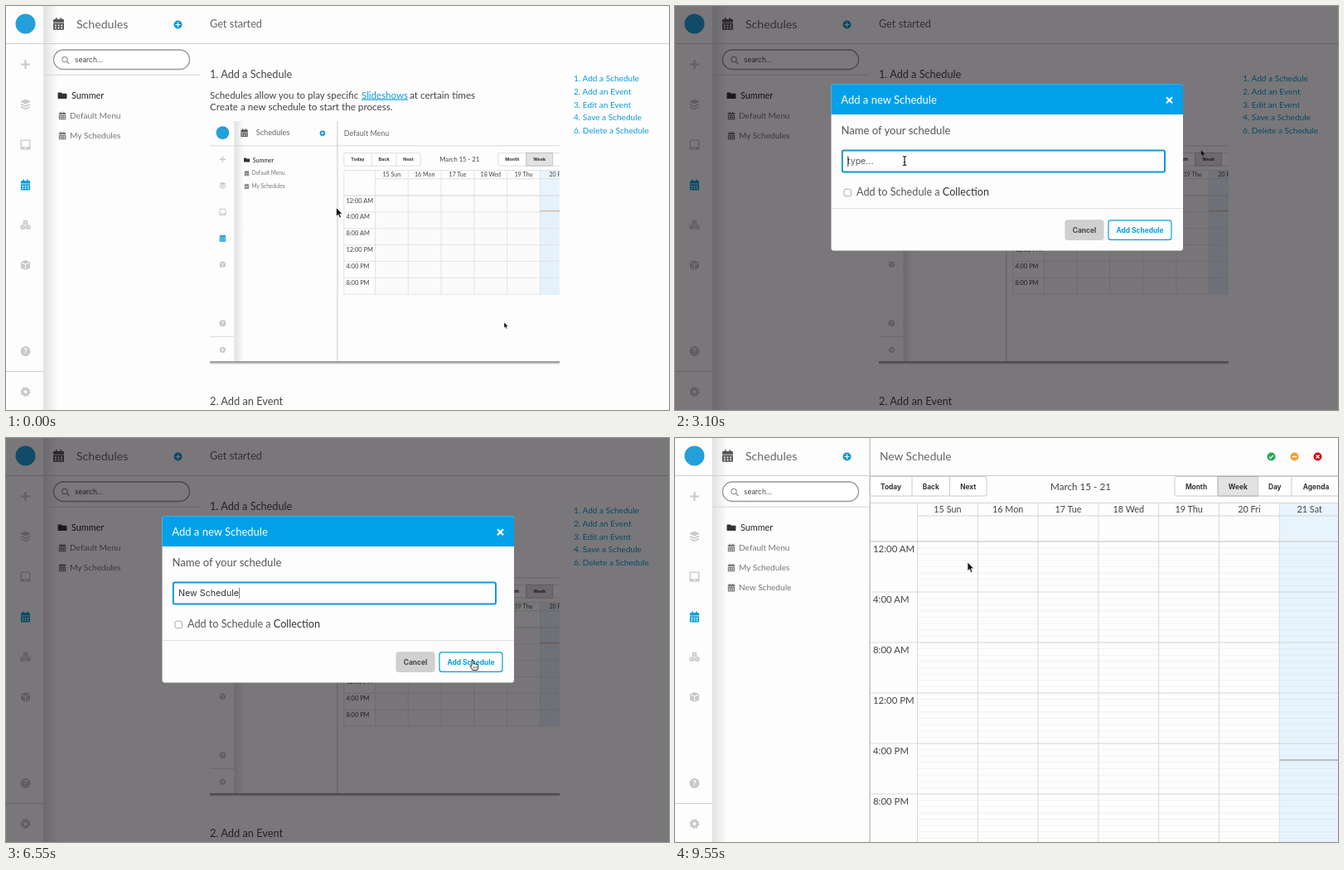
An HTML page for the animation above (9600 ms loop, 800 px wide and 488 px high).

```html
<!DOCTYPE html>
<html lang="en">
<head>
<meta charset="utf-8">
<title>Adding a schedule</title>
<style>
  html, body { margin: 0; width: 100%; height: 100%; overflow: hidden; background: #fefdfe; }
  svg { display: block; font-family: Lato, sans-serif; }
  .ui { font-family: Inter, sans-serif; }
  .bold { font-family: Inter, sans-serif; font-weight: 700; text-anchor: middle; }
  .mid { text-anchor: middle; }
</style>
</head>
<body>
<svg id="stage" width="800" height="488" viewBox="0 0 800 488"></svg>
<script>
const LOOP = 9600, STEP = 50;
const BLUE = '#0a9bd8', INK = '#444', GREY = '#c8c8c8', PAPER = '#fefdfe';
const DAYS = ['15 Sun', '16 Mon', '17 Tue', '18 Wed', '19 Thu', '20 Fri', '21 Sat'];
const HOURS = ['12:00 AM', '4:00 AM', '8:00 AM', '12:00 PM', '4:00 PM', '8:00 PM'];

const clamp = (v, lo = 0, hi = 1) => Math.min(hi, Math.max(lo, v));
const ramp = (t, from, to) => clamp((t - from) / (to - from));
const ease = p => p * p * (3 - 2 * p);
const between = (t, a, b) => t >= a && t < b;

// --- drawing helpers
const text = (x, y, size, str, fill = INK, attrs = '') =>
  `<text x="${x}" y="${y}" font-size="${size}" fill="${fill}" ${attrs}>${str}</text>`;
const rect = (x, y, w, h, fill, attrs = '') =>
  `<rect x="${x}" y="${y}" width="${w}" height="${h}" fill="${fill}" ${attrs}/>`;
const stroke = (d, color, width = 1, attrs = '') =>
  `<path d="${d}" fill="none" stroke="${color}" stroke-width="${width}" ${attrs}/>`;
const circle = (x, y, r, fill) => `<circle cx="${x}" cy="${y}" r="${r}" fill="${fill}"/>`;
const at = (x, y, body, scale = 1, attrs = '') =>
  `<g transform="translate(${x} ${y}) scale(${scale})" ${attrs}>${body}</g>`;
const dim = (w, h) => rect(0, 0, w, h, '#040005', 'opacity=".53"');

const cube = '<path d="M0-7L6.5-4.3V4L0 7-6.5 4V-4.3z"/>' +
  stroke('M-5.2-3.2L0-1 5.2-3.2M0-1V6', PAPER, 1.3);
const calendarHoles = [-5, -1, 3].flatMap(x => [1, 4.3].map(y => `M${x} ${y}v2h2v-2z`)).join('');
const icons = {
  plus: '<path d="M-1.1-5.5h2.2v4.4h4.4v2.2h-4.4v4.4h-2.2v-4.4h-4.4v-2.2h4.4z"/>',
  layers: '<path d="M0-6.5L6.5-3.5 0-.5-6.5-3.5zM-6.5 0l2-.9L0 1.2 4.5-.9l2 .9L0 3zM-6.5 3.3l2-.9L0 4.5 4.5 2.4l2 .9L0 6.3z"/>',
  tablet: '<path fill-rule="evenodd" d="M-5-6h10q1 0 1 1v10q0 1-1 1h-10q-1 0-1-1v-10q0-1 1-1zM-4.6-4.7v7.4h9.2v-7.4zM-1 3.6v1.4h2v-1.4z"/>',
  calendar: `<path fill-rule="evenodd" d="M-6-6h2v-2h2v2h4v-2h2v2h2q1 0 1 1v3h-14v-3q0-1 1-1zM-7-1h14v8q0 1-1 1h-12q-1 0-1-1z${calendarHoles}"/>`,
  folder: '<path d="M-8-5q0-1 1-1h5l2 2h7q1 0 1 1v7q0 1-1 1h-14q-1 0-1-1z"/>',
  cube: at(0, 0, cube, .85),
  cubes: at(0, -3, cube, .45) + at(-3.2, 2.6, cube, .45) + at(3.2, 2.6, cube, .45),
  help: circle(0, 0, 6, GREY) + text(0, 3.4, 9, '?', PAPER, 'class="bold"'),
  gear: `<g fill="none" stroke="${GREY}"><circle r="3.4" stroke-width="2.8"/><circle r="5" stroke-width="2" stroke-dasharray="2.2 1.73"/></g>`
};
const icon = (name, x, y, fill = GREY, scale = 1) => at(x, y, icons[name], scale, `fill="${fill}"`);

const cursors = {
  arrow: '<path d="M0 0V10.6L2.4 8.4 4.1 12.4 6 11.6 4.3 7.7H7.6z" fill="#111" stroke="#fff" stroke-width=".7"/>',
  hand: '<path d="M-1 0.8q1-1.4 2 0V5q1.2-.9 2 .2 1.2-.7 1.9.4 1.6-.4 1.8 1V9q0 2-1.3 3.5H.2Q-1 10.4-3 7.6q0-1.4 2-.2z" fill="#fff" stroke="#111" stroke-width=".9"/>' +
    stroke('M1.2 8v2.6M3 8v2.6M4.8 8v2.6', '#111', .6),
  beam: stroke('M-2.2-5.5Q0-5.5 0-4 0-5.5 2.2-5.5M0-4.5V4.5M-2.2 5.5Q0 5.5 0 4 0 5.5 2.2 5.5M-1.2 1.5H1.2', '#111', 1.1)
};

// Each stop is [arrive, leave, x, y].
function follow(stops, t) {
  const i = stops.findIndex(s => t < s[0]);
  if (i < 0) return stops[stops.length - 1].slice(2);
  const a = stops[i - 1], b = stops[i], p = ease(ramp(t, a[1], b[0]));
  return [a[2] + (b[2] - a[2]) * p, a[3] + (b[3] - a[3]) * p];
}
const pointer = (stops, t, kind) => kind ? at(...follow(stops, t), cursors[kind]) : '';

// --- parts shared by the page and the tutorial clip inside it
function row(y, label, { folder, hover, indent = 0 } = {}) {
  const x = 68 + indent, ink = hover ? BLUE : folder ? '#222' : '#777';
  return (hover ? rect(57 + indent, y - 12, 165 - indent * 1.6, 24, '#ececf2', 'rx="3"') : '') +
    icon(folder ? 'folder' : 'calendar', x, y, folder ? '#333' : hover ? BLUE : '#777', folder ? .68 : .6) +
    text(x + (folder ? 11 : 9), y + 3.7, folder ? 10.8 : 10.1, label, ink);
}

function frameOf(height, width, tools, buttonGrow = 0) {
  const side = tools.map((name, i) =>
    icon(name, 23.5, 70.5 + i * 48.5, name === 'calendar' ? BLUE : GREY, name === 'calendar' ? .8 : 1)).join('');
  return rect(45, 0, 18, height, 'url(#shade)') +
    stroke(`M0 45.5H${width}M0 ${height - 46.5}H45`, '#cfcfcf', 1.2) +
    circle(23.5, 21.5, 12, '#239fd9') + side +
    icon('help', 23.5, height - 71) + icon('gear', 23.5, height - 22) +
    icon('calendar', 63.5, 21.5, '#555', .92) + text(85, 26.5, 14.1, 'Schedules', '#666') +
    circle(207.5, 22.5, 5 + 7 * buttonGrow, BLUE) + icon('plus', 207.5, 22.5, '#fff', .53 + .3 * buttonGrow);
}

function buttonBar(edges, y, labels, active) {
  const end = edges[labels.length];
  return rect(edges[0], y, end - edges[0], 23.5, '#fff', 'rx="2" stroke="#ccc"') +
    labels.map((label, i) => {
      const w = edges[i + 1] - edges[i];
      return (label === active ? rect(edges[i], y, w, 23.5, '#e2e2e2', 'stroke="#aaa"') : '') +
        (i ? stroke(`M${edges[i]} ${y}v23.5`, '#ccc') : '') +
        text(edges[i] + w / 2, y + 15, 8.3, label, '#333', 'class="bold"');
    }).join('');
}

function calendar({ x, y, colW, rowH, titleX, rightX, today, nowY, nowColor }) {
  const left = x + 57.5, right = left + 7 * colW, top = y + 32, body = y + 78.5, bottom = body + 6 * rowH;
  let faint = '', grid = '', labels = '';
  for (let i = 1; i < 48; i++) faint += `M${left} ${body + i * rowH / 8}H${right}`;
  DAYS.forEach((day, i) => {
    grid += `M${left + i * colW} ${top}V${bottom}`;
    labels += text(left + (i + .5) * colW, top + 11, 10.8, day, INK, 'class="mid"');
  });
  HOURS.forEach((hour, i) => {
    grid += `M${x} ${body + (i + 1) * rowH}H${right}`;
    labels += text(x + 4, body + i * rowH + 13, 11.4, hour);
  });
  const todayX = left + today * colW;
  return buttonBar([0, 51, 96.5, 141].map(e => x + e), y, ['Today', 'Back', 'Next']) +
    text(titleX, y + 16.5, 11.7, 'March 15 - 21', INK, 'class="mid"') +
    buttonBar([0, 52, 100.5, 141, 200].map(e => rightX + e), y, ['Month', 'Week', 'Day', 'Agenda'], 'Week') +
    rect(todayX, top, colW, bottom - top, '#e8f4fd') +
    stroke(faint, '#000', 1, 'opacity=".045"') + stroke(grid, '#d9d9d9') +
    stroke(`M${x} ${bottom}V${top}H${right}M${left} ${top + 15.5}H${right}`, '#d4d4d4') +
    stroke(`M${x} ${body}H${right}`, '#d4d4d4', 1.6) +
    stroke(`M${todayX} ${nowY}h${colW}`, nowColor, 1.3) + labels;
}

function button(right, y, w, label, color, fill = '#fff', ink = color) {
  return rect(right - w, y, w, 23.5, fill, `rx="3" stroke="${color}" stroke-width="1.2"`) +
    text(right - w / 2, y + 15.2, 8.4, label, ink, 'class="bold"');
}

function panel(w, h, color, title, body) {
  return rect(0, 0, w, h, PAPER, 'rx="3"') +
    `<path d="M0 36.8V3Q0 0 3 0H${w - 3}Q${w} 0 ${w} 3V36.8z" fill="${color}"/>` +
    text(11.8, 24.3, 13, title, '#fff') +
    stroke(`M${w - 20} 16l7 7m0-7l-7 7`, '#fff', 2.2) +
    stroke(`M0 ${h - 51}H${w}`, '#ddd') + body;
}

function scheduleDialog(w, typed, focused, checkLabel, lastWord) {
  const field = typed
    ? text(19.5, 97.2, 10.7, `${typed}<tspan dx="-1" font-weight="300">|</tspan>`, '#333', 'class="ui"')
    : text(19.5, 97.2, 10.6, 'type...', '#555', 'class="ui"') + stroke('M20.3 87v13', '#222', .9);
  return panel(w, 201.2, '#02a0e9', 'Add a new Schedule',
    text(12, 60.8, 13.1, 'Name of your schedule', '#555') +
    rect(13.3, 80.3, w - 35.3, 26, '#fff', `rx="2" stroke="${focused ? '#1598cc' : '#aaa'}" stroke-width="${focused ? 2 : 1.2}"`) +
    field + rect(15.5, 127, 8.5, 8.5, '#fff', 'rx="2" stroke="#aaa"') +
    text(30.5, 134.5, 12.65, `${checkLabel} <tspan fill="#333">${lastWord}</tspan>`, '#555') +
    button(w - 96, 164.6, 46, 'Cancel', '#d0d0d0', '#d0d0d0', '#444') +
    button(w - 14, 164.6, 76, 'Add Schedule', BLUE));
}

const eventDialog = w => panel(w, 157, '#0fb455', 'Add an Event',
  button(w - 62, 121, 46, 'Cancel', '#d0d0d0', '#d0d0d0', '#444') +
  button(w - 14, 121, 37, 'Save', '#14904a'));

// --- tutorial clip
const clipStops = [
  [0, 300, 542, 371], [950, 1150, 110, 72], [1400, 1900, 116, 99], [2700, 3300, 593.5, 53.5],
  [3900, 4800, 500, 180], [5200, 5450, 580, 227], [6300, 6700, 208, 23], [7000, 7500, 215, 186], [7950, LOOP, 560, 270]
];

function clip(t) {
  const open = between(t, 1000, 6000);
  const adding = t >= 6800, editing = between(t, 4050, 5400);
  const list = [['Summer', { folder: true }]];
  if (open) list.push(['Christmas Specials', { indent: 18, hover: between(t, 1350, 2000) }],
    ['Weekend Specials', { indent: 18 }], ['New Schedule 1', { indent: 18 }]);
  list.push(['Default Menu'], ['My Schedules']);
  const typed = 'New Schedule 1'.slice(0, clamp(Math.floor((t - 7250) / 45), 0, 14));
  const kind = adding ? (between(t, 6950, 7300) ? 'beam' : between(t, 7300, 7500) ? '' : 'arrow')
    : between(t, 900, 2000) ? 'hand' : 'arrow';
  return `<svg x="246" y="139" width="422" height="291" viewBox="0 0 644.3 444.3">` +
    rect(0, 0, 645, 445, PAPER) +
    frameOf(444, 645, ['plus', 'layers', 'tablet', 'calendar', 'cube']) +
    stroke('M235 0V445', '#c4c4c4', 1.4) +
    text(247, 27, 13.7, 'Default Menu', '#666') +
    list.map(([label, opts], i) => row(72 + i * 24.2, label, opts)).join('') +
    calendar({ x: 247, y: 59, colW: 60.8, rowH: 30.3, titleX: 460, rightX: 531, today: 5, nowY: 165.6, nowColor: '#c9a394' }) +
    (adding || editing ? dim(645, 445) : '') +
    (editing ? at(128, 95, eventDialog(485)) : '') +
    (adding ? at(128, 95, scheduleDialog(485, typed, false, 'Add to schedule a', 'collection')) : '') +
    pointer(clipStops, t, kind) + '</svg>' +
    stroke('M246 430H668', '#808080', 1.6) + stroke('M246 431.7H668', '#ccc', 1.4);
}

// --- page
const mouseStops = [
  [0, 100, 398.5, 243.5], [1050, 1650, 209, 21.5], [2300, 5700, 277, 187],
  [6250, 6600, 563, 268], [7050, 8400, 102, 181], [9250, LOOP, 353, 150]
];

function mouseKind(t) {
  if (between(t, 1000, 1700) || between(t, 6200, 6600) || between(t, 7000, 8450)) return 'hand';
  if (between(t, 2250, 3400)) return 'beam';
  return between(t, 3400, 5800) ? '' : 'arrow';
}

const guide = t =>
  text(246, 26, 12.7, 'Get started', '#666') +
  text(246, 86.8, 12.7, '1. Add a Schedule') +
  text(246, 111.5, 11.5, 'Schedules allow you to play specific') +
  text(429, 111.5, 11.5, 'Slideshows', BLUE, 'text-decoration="underline"') +
  text(487, 111.5, 11.7, 'at certain times') +
  text(246, 125.5, 11.7, 'Create a new schedule to start the process.') +
  ['1. Add a Schedule', '2. Add an Event', '3. Edit an Event', '4. Save a Schedule', '6. Delete a Schedule']
    .map((label, i) => text(685, 91.3 + i * 15.7, 10.1, label, BLUE)).join('') +
  clip(t) + text(246, 482, 12.8, '2. Add an Event');

const week = () =>
  text(247, 26.5, 13.8, 'New Schedule', '#666') +
  circle(719.5, 22.5, 5, '#21a85a') + stroke('M717 22.6l1.8 1.8 3.2-3.5', '#fff', 1.3) +
  circle(747.5, 22.5, 5, '#f0a030') + stroke('M744.7 22.5h5.6', '#fff', 1.4) +
  circle(775.5, 22.5, 5, '#cc0c10') + stroke('M773.5 20.5l4 4m0-4l-4 4', '#fff', 1.3) +
  calendar({ x: 235, y: 46.5, colW: 72.8, rowH: 61, titleX: 489.5, rightX: 603, today: 6, nowY: 389, nowColor: '#aaa' }) +
  stroke('M235.2 0V488', '#c4c4c4', 1.4);

function typedName(t) {
  const count = t < 4150 ? clamp(Math.floor((t - 3250) / 250), 0, 3) : 3 + Math.floor((t - 4150) / 150);
  return 'New Schedule'.slice(0, count);
}

function scene(t) {
  const grow = ease(ramp(t, 950, 1150)) * (1 - ramp(t, 1700, 1850));
  const shown = ramp(t, 1650, 1800) * (1 - ramp(t, 6600, 6700));
  const added = t >= 6700;
  return `<defs><linearGradient id="shade"><stop stop-opacity=".11"/><stop offset="1" stop-opacity="0"/></linearGradient></defs>` +
    rect(0, 0, 800, 488, PAPER) +
    frameOf(488, 800, ['plus', 'layers', 'tablet', 'calendar', 'cubes', 'cube'], grow) +
    rect(57.5, 53, 164, 23.5, '#fff', 'rx="11.7" stroke="#999" stroke-width="1.4"') +
    '<circle cx="71" cy="64.5" r="3.2" fill="none" stroke="#999" stroke-width="1.2"/>' + stroke('M73.4 67l3 3', '#999', 1.4) +
    text(83, 68.2, 8.4, 'search...', INK, 'class="ui"') + stroke('M45 83.2H234', '#d4d4d4') +
    row(108.5, 'Summer', { folder: true }) + row(132.5, 'Default Menu') + row(156.5, 'My Schedules') +
    (added ? row(180.7, 'New Schedule', { hover: between(t, 7000, 8450) }) : '') +
    (t < 8300 ? guide(t) : week()) +
    (shown ? `<g opacity="${shown}">` + dim(800, 488) +
      at(188.5, 94.2, scheduleDialog(424.5, typedName(t), t >= 2350, 'Add to Schedule a', 'Collection')) + '</g>' : '') +
    pointer(mouseStops, t, mouseKind(t));
}

const stage = document.getElementById('stage');
let last = -1;
function tick() {
  const t = Math.floor(performance.now() % LOOP / STEP) * STEP;
  if (t !== last) stage.innerHTML = scene(last = t);
  requestAnimationFrame(tick);
}
tick();
</script>
</body>
</html>
```
